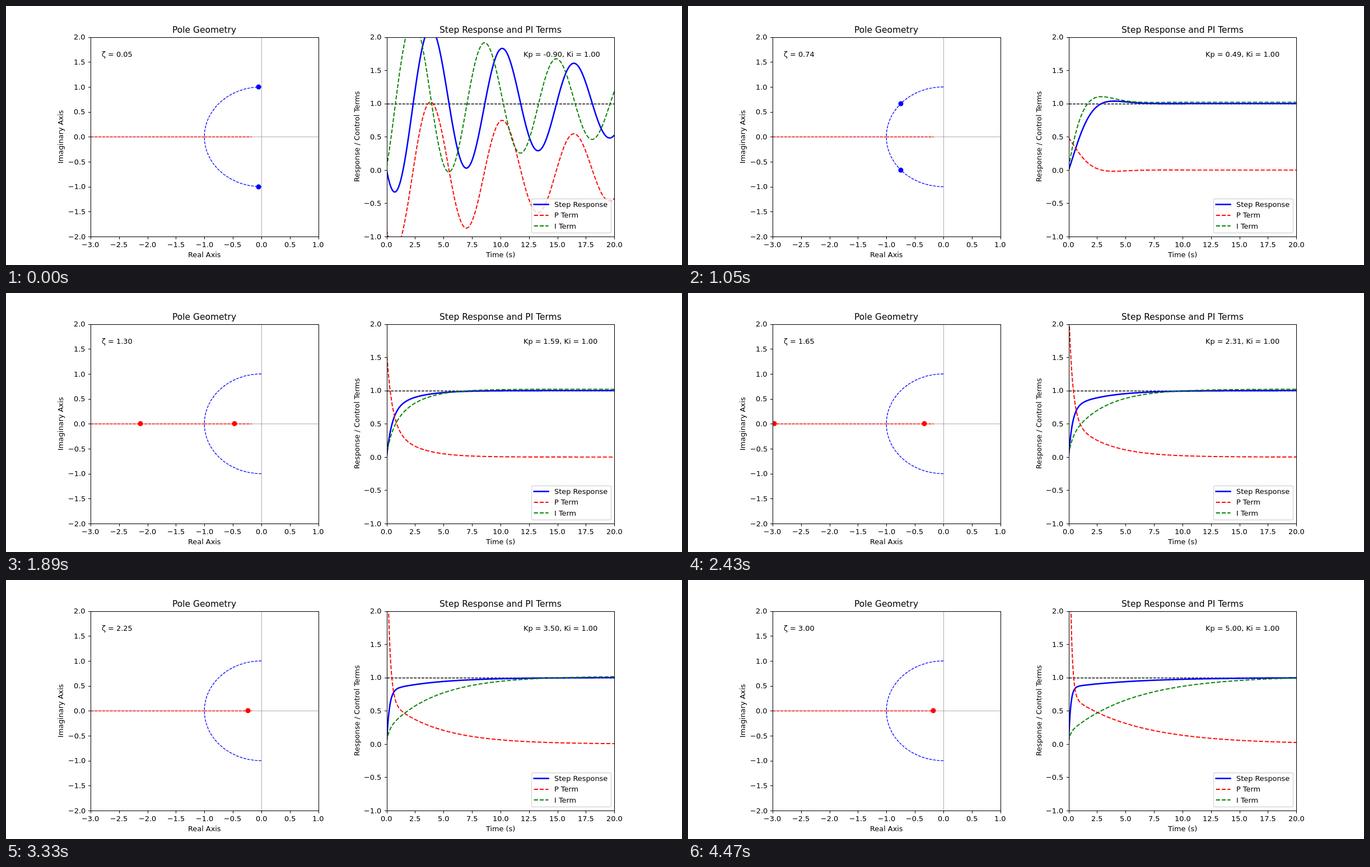
Recreate the animation shown at these times as an HTML page with a canvas. Size 1207 by 464 pixels, loop 4500 ms.

```html
<!DOCTYPE html>
<html lang="en">
<head>
<meta charset="utf-8">
<title>Pole Geometry and Step Response</title>
<style>
html, body { margin: 0; width: 1207px; height: 464px; overflow: hidden; background: #fff; }
canvas { display: block; }
</style>
</head>
<body>
<canvas id="stage" width="1207" height="464"></canvas>
<script>
const W = 1207, H = 464, PT = W / 936;
const STEPS = 150, STEP_MS = 30;
const SAMPLES = 500, T_END = 20, DT = T_END / (SAMPLES - 1);
const ctx = document.getElementById('stage').getContext('2d');

const AXES_W = W * 0.775 / 2.3;
const TOP = H * 0.12, BOTTOM = H * 0.89;

function makeAxes(left, xMin, xMax, yMin, yMax) {
  return {
    left, right: left + AXES_W, mid: left + AXES_W / 2,
    x: v => left + (v - xMin) / (xMax - xMin) * AXES_W,
    y: v => BOTTOM - (v - yMin) / (yMax - yMin) * (BOTTOM - TOP),
    xMin, xMax, yMin, yMax
  };
}

const poleAxes = makeAxes(W * 0.125, -3, 1, -2, 2);
const stepAxes = makeAxes(W * 0.9 - AXES_W, 0, 20, -1, 2);

const snap = v => Math.round(v) + 0.5;

function pen(color, width, dashed) {
  const w = width * PT;
  ctx.strokeStyle = color;
  ctx.lineWidth = w;
  ctx.lineJoin = 'round';
  ctx.setLineDash(dashed ? [3.7 * w, 1.6 * w] : []);
}

function line(x1, y1, x2, y2) {
  ctx.beginPath();
  ctx.moveTo(x1, y1);
  ctx.lineTo(x2, y2);
  ctx.stroke();
}

function text(str, x, y, align = 'left', size = 10) {
  ctx.font = `${size * PT}px "DejaVu Sans", sans-serif`;
  ctx.textAlign = 'left';
  ctx.textBaseline = 'alphabetic';
  ctx.fillStyle = '#000';
  const w = ctx.measureText(str).width;
  const shift = { left: 0, center: w / 2, right: w }[align];
  ctx.fillText(str, Math.round(x - shift), Math.round(y));
}

function verticalText(str, x, y) {
  ctx.save();
  ctx.translate(x, y);
  ctx.rotate(-Math.PI / 2);
  text(str, 0, 0, 'center');
  ctx.restore();
}

function clipped(ax, draw) {
  ctx.save();
  ctx.beginPath();
  ctx.rect(Math.round(ax.left), Math.round(TOP), Math.round(AXES_W), Math.round(BOTTOM - TOP));
  ctx.clip();
  draw();
  ctx.restore();
}

const label = (v, digits) => v.toFixed(digits).replace('-', '\u2212');

function drawFrame(ax, xStep, title, xName, yName) {
  pen('#000', 0.8);
  const len = 3.5 * PT, base = snap(BOTTOM), side = snap(ax.left);
  for (let v = ax.xMin; v <= ax.xMax; v += xStep) {
    const x = snap(ax.x(v));
    line(x, base, x, base + len);
    text(label(v, 1), ax.x(v), 432, 'center');
  }
  for (let v = ax.yMin; v <= ax.yMax; v += 0.5) {
    const y = snap(ax.y(v));
    line(side, y, side - len, y);
    text(label(v, 1), ax.left - 7 * PT, ax.y(v) + 4.7, 'right');
  }
  ctx.lineJoin = 'miter';
  ctx.strokeRect(side, snap(TOP), snap(ax.right) - side, base - snap(TOP));
  text(title, ax.mid, TOP - 6 * PT, 'center', 12);
  text(xName, ax.mid, 450, 'center');
  verticalText(yName, Math.round(ax.left - 48.5), (TOP + BOTTOM) / 2);
}

function marker(re, im, color) {
  ctx.fillStyle = color;
  ctx.beginPath();
  ctx.arc(Math.round(poleAxes.x(re)), Math.round(poleAxes.y(im)), 3.5 * PT, 0, 2 * Math.PI);
  ctx.fill();
}

function drawPoles(zeta) {
  const ax = poleAxes, x0 = ax.x(0), y0 = ax.y(0);
  clipped(ax, () => {
    pen('#808080', 0.5);
    line(ax.left, snap(y0), ax.right, snap(y0));
    line(snap(x0), TOP, snap(x0), BOTTOM);

    pen('#00f', 1, true);
    const rx = x0 - ax.x(-1), ry = y0 - ax.y(1);
    for (const up of [true, false]) {
      ctx.beginPath();
      ctx.ellipse(x0, y0, rx, ry, 0, up ? -Math.PI / 2 : Math.PI / 2, Math.PI, up);
      ctx.stroke();
    }

    pen('#f00', 1, true);
    const root = Math.sqrt(8);
    line(snap(ax.x(-1)), snap(y0), snap(ax.x(-3 + root)), snap(y0));
    line(snap(ax.x(-1)), snap(y0), snap(ax.x(-3 - root)), snap(y0));

    const d = Math.sqrt(Math.abs(1 - zeta * zeta));
    for (const sign of [1, -1]) {
      if (zeta < 1) marker(-zeta, sign * d, '#00f');
      else marker(-zeta + sign * d, 0, '#f00');
    }
  });
  text('\u03b6 = ' + zeta.toFixed(2), ax.x(-2.8), ax.y(1.6));
  drawFrame(ax, 0.5, 'Pole Geometry', 'Real Axis', 'Imaginary Axis');
}

// Unit step through (Kp s + 1) / (s^2 + 2 zeta s + 1), with Kp = 2 zeta - 1.
function response(zeta, t) {
  const w = Math.sqrt(Math.abs(1 - zeta * zeta));
  const c = zeta < 1 ? Math.cos(w * t) : Math.cosh(w * t);
  const s = (zeta < 1 ? Math.sin(w * t) : Math.sinh(w * t)) / w;
  return 1 - Math.exp(-zeta * t) * (c + (1 - zeta) * s);
}

// Parts above the stage are cut off so dashes begin at its edge.
function curve(values) {
  const edge = -1;
  let px, py;
  ctx.beginPath();
  values.forEach((v, i) => {
    const x = stepAxes.x(i * DT), y = stepAxes.y(v);
    if (i === 0) {
      if (y >= edge) ctx.moveTo(x, y);
    } else {
      const cross = px + (x - px) * (edge - py) / (y - py);
      if (py < edge && y >= edge) ctx.moveTo(cross, edge);
      if (y >= edge) ctx.lineTo(x, y);
      else if (py >= edge) ctx.lineTo(cross, edge);
    }
    px = x;
    py = y;
  });
  ctx.stroke();
}

function drawLegend() {
  const left = 938.5, top = 345.5, x = 942.7;
  ctx.save();
  ctx.globalAlpha = 0.8;
  ctx.fillStyle = '#fff';
  pen('#ccc', 1);
  ctx.beginPath();
  ctx.roundRect(left, top, 142, 61, 2 * PT);
  ctx.fill();
  ctx.stroke();
  ctx.restore();
  const rows = [
    ['Step Response', '#00f', 2, 355.5, 360],
    ['P Term', '#f00', 1.5, 375, 379],
    ['I Term', '#008000', 1.5, 394, 399]
  ];
  rows.forEach(([name, color, width, y, base], i) => {
    pen(color, width, i > 0);
    ctx.lineCap = i ? 'butt' : 'square';
    line(x, y, x + 20 * PT, y);
    ctx.lineCap = 'butt';
    text(name, 979, base);
  });
}

function drawResponse(zeta) {
  const ax = stepAxes, kp = 2 * zeta - 1;
  const out = [], prop = [], integ = [];
  let sum = 0;
  for (let i = 0; i < SAMPLES; i++) {
    const y = response(zeta, i * DT);
    sum += (1 - y) * DT;
    out.push(y);
    prop.push(kp * (1 - y));
    integ.push(sum);
  }
  clipped(ax, () => {
    pen('#000', 1, true);
    line(snap(ax.left), snap(ax.y(1)), snap(ax.right), snap(ax.y(1)));
    pen('#00f', 2);
    curve(out);
    pen('#f00', 1.5, true);
    curve(prop);
    pen('#008000', 1.5, true);
    curve(integ);
  });
  drawFrame(ax, 2.5, 'Step Response and PI Terms', 'Time (s)', 'Response / Control Terms');
  text(`Kp = ${kp.toFixed(2)}, Ki = 1.00`, ax.x(12), ax.y(1.7));
  drawLegend();
}

let start = null;

function tick(now) {
  if (start === null) start = now;
  const step = Math.floor((now - start) / STEP_MS) % STEPS;
  const zeta = 0.05 + 2.95 * step / (STEPS - 1);
  ctx.setLineDash([]);
  ctx.fillStyle = '#fff';
  ctx.fillRect(0, 0, W, H);
  drawPoles(zeta);
  drawResponse(zeta);
  requestAnimationFrame(tick);
}

requestAnimationFrame(tick);
</script>
</body>
</html>
```
